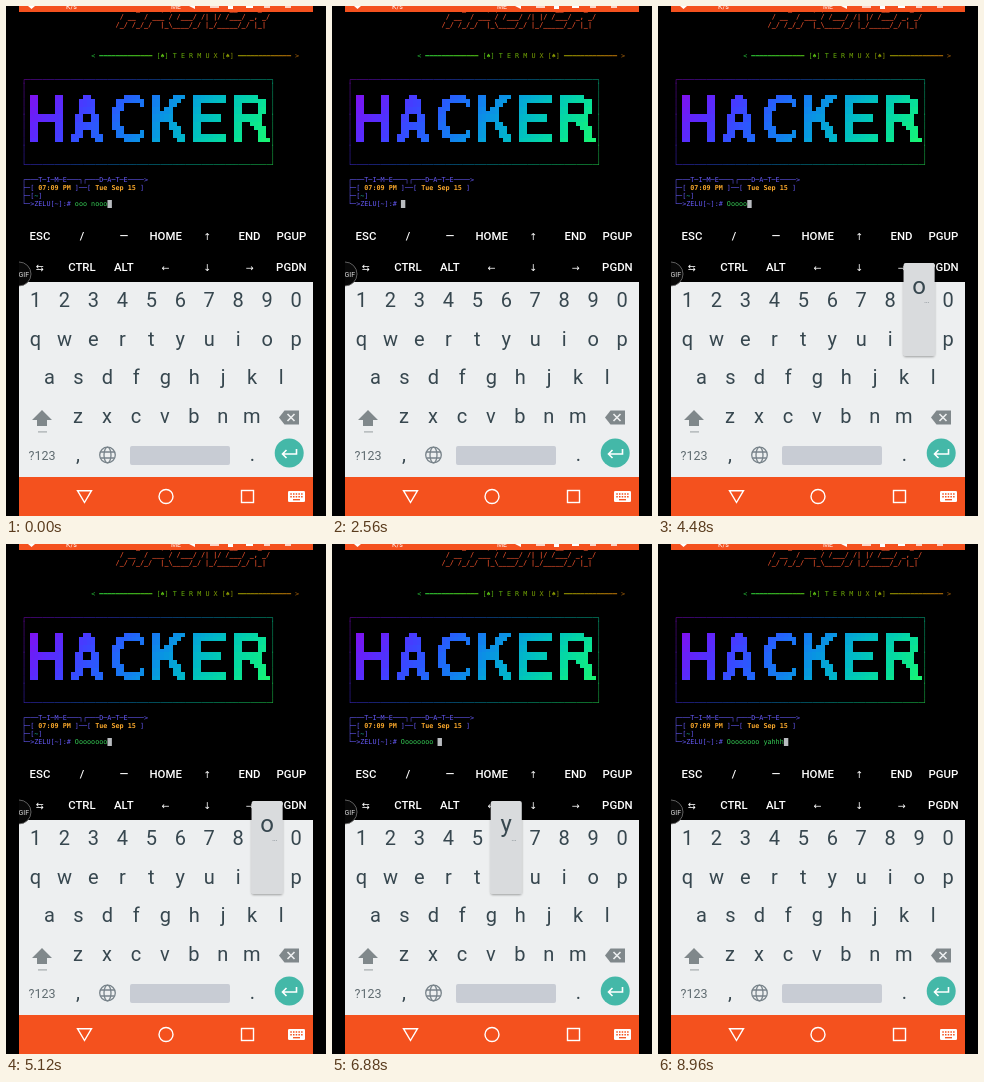
An HTML page that plays this animation: 320 by 510 pixels, repeating every 9600 ms.

```html
<!DOCTYPE html>
<html lang="en">
<head>
<meta charset="utf-8">
<style>
  html, body { margin: 0; width: 100%; height: 100%; overflow: hidden; background: #000; }
  svg { display: block; width: 320px; height: 510px; }
  text { white-space: pre; }
  .mono { font: 6.76px "DejaVu Sans Mono", monospace; }
  .bold { font-weight: bold; }
  .faint { opacity: .75; }
  .extra { font: 500 11.4px Roboto, "DejaVu Sans", sans-serif; fill: #fff; text-anchor: middle; }
  .arrow { font: 9.5px "DejaVu Sans", sans-serif; }
  .key { font: 20px Roboto, sans-serif; fill: #37474f; text-anchor: middle; }
  .nav { fill: none; stroke: #fff; stroke-width: 1.4; }
</style>
</head>
<body>
<svg id="stage" viewBox="0 0 320 510" xmlns="http://www.w3.org/2000/svg">
  <defs>
    <clipPath id="screen"><rect x="13" width="294" height="510"/></clipPath>
    <filter id="shadow" x="-20%" y="-10%" width="140%" height="120%">
      <feDropShadow dx="0" dy="1" stdDeviation="1" flood-opacity=".35"/>
    </filter>
  </defs>
  <rect width="320" height="510"/>
  <g id="terminal" class="mono"></g>
  <text class="mono" id="prompt" x="16" y="200.2"><tspan fill="#665af8">└─&gt;ZELU[~]:# </tspan><tspan id="typed" fill="#35cc55"></tspan></text>
  <rect id="cursor" y="194" width="4.4" height="8" fill="#b9bcc0"/>

  <g clip-path="url(#screen)">
    <rect x="13" width="294" height="6" fill="#f4511e"/>
    <g fill="#fff">
      <path d="M22 0h7l-3.5 3zM183 0h6v3zM240 0h7v2h-7zM222 0h5v3h-5z"/>
      <text x="60" y="3" font-family="Roboto, sans-serif" font-size="7">K/s</text>
      <text x="165" y="3" font-family="Roboto, sans-serif" font-size="7">ME</text>
      <path d="M204 1h9M258 1h6M279 1h6" stroke="#fff" stroke-width="1.4"/>
    </g>
    <rect x="13" y="276" width="294" height="195" fill="#edeff0"/>
    <rect id="pressed" y="393" width="42" height="37" rx="3" fill="#d3d8db"/>
    <g id="keys"></g>

    <g fill="#80888b">
      <path d="M36 404 46 414H41V420H31V414H26Z"/>
      <rect x="32" y="425.3" width="9" height="1.2" fill="#a5abae"/>
      <path d="M278.5 404.5H293V418.5H278.5L273 411.5Z"/>
    </g>
    <path d="M281.5 408l7 7m0-7l-7 7" stroke="#edeff0" stroke-width="1.6"/>
    <text x="36" y="453.6" font-family="Roboto, sans-serif" font-size="12.5" fill="#5f6b70" text-anchor="middle">?123</text>
    <g fill="none" stroke="#78838a" stroke-width="1.3">
      <circle cx="101.5" cy="449" r="7.8"/>
      <ellipse cx="101.5" cy="449" rx="3.5" ry="7.8"/>
      <path d="M94.5 446h14m-14 6h14"/>
    </g>
    <rect x="124" y="440" width="100" height="19" rx="2" fill="#c8ccd4"/>
    <circle cx="283.2" cy="447" r="14.5" fill="#44b8a8"/>
    <path d="M290.5 443v5H276.5m4-4-4 4 4 4" fill="none" stroke="#fff" stroke-width="1.6"/>

    <rect x="13" y="471" width="294" height="39" fill="#f4511e"/>
    <path class="nav" d="M71.5 484.7H85.5L78.5 496.5Z"/>
    <circle class="nav" cx="160" cy="490.5" r="7"/>
    <rect class="nav" x="235.5" y="484.5" width="12" height="12"/>
    <rect x="282" y="485" width="17" height="11" rx="1.3" fill="#fff"/>
    <path d="M284.3 488h13m-13 2.8h13" stroke="#f4511e" stroke-width="1.5" stroke-dasharray="1.5 1.2"/>
    <path d="M287 493.7h7" stroke="#f4511e" stroke-width="1.3"/>

    <circle cx="13" cy="268" r="12" fill="#080808" stroke="#777" stroke-width=".8"/>
    <text x="12.5" y="270.5" font-family="Roboto, sans-serif" font-size="7" fill="#ddd">GIF</text>

    <g id="popup">
      <rect x="-15.5" y="-76" width="31" height="93" rx="2" fill="#d9dbdd" filter="url(#shadow)"/>
      <text id="popupLetter" class="key" y="-45.5" style="font-size:24px"></text>
      <text x="5" y="-36" font-family="Roboto, sans-serif" font-size="8" fill="#7b858a">…</text>
    </g>
  </g>
</svg>
<script>
const $ = id => document.getElementById(id);
const CELL = 4.07, ROW = 7.75, LEFT = 16, LOOP = 9600;

function add(parent, tag, attrs, content = '') {
  const el = document.createElementNS('http://www.w3.org/2000/svg', tag);
  for (const name in attrs) el.setAttribute(name, attrs[name]);
  el.textContent = content;
  parent.append(el);
  return el;
}

// Terminal: rainbow colour depends on column and row
function rainbow(phase, col, row) {
  const angle = phase + col / 31 + row / 20;
  const channel = k => Math.round(128 + 127 * Math.sin(angle + k * 2 * Math.PI / 3));
  return `rgb(${channel(0)},${channel(1)},${channel(2)})`;
}

function rainbowLine(line, col, row, top, phase) {
  const text = add($('terminal'), 'text', { class: 'faint', x: LEFT + col * CELL, y: top + row * ROW + 2 });
  [...line].forEach((char, i) =>
    add(text, 'tspan', { fill: rainbow(phase, col + i, row) }, char));
}

const slant = [
  '  / /_/ / /| |/ /   / ,<  / __/ / /_/ /',
  ' / __  / ___ / /___/ /| |/ /___/ _, _/',
  '/_/ /_/_/  |_\\____/_/ |_/_____/_/ |_|'
];
slant.forEach((line, row) => add($('terminal'), 'text', {
  class: 'bold', x: LEFT + 23 * CELL, y: 5.4 + row * ROW, fill: '#e8502a'
}, line));

const rule = '━'.repeat(13);
rainbowLine(`< ${rule} [♠] T E R M U X [♠] ${rule} >`, 17, 0, 49.8, 5.1);

const BANNER_TOP = 73.5, BANNER_PHASE = 3;
const banner = [
  ' ▄▄    ▄▄     ▄▄        ▄▄▄▄   ▄▄   ▄▄▄  ▄▄▄▄▄▄▄▄  ▄▄▄▄▄▄',
  ' ██    ██    ████     ██▀▀▀▀█  ██  ██▀   ██▀▀▀▀▀▀  ██▀▀▀▀██',
  ' ██    ██    ████    ██▀       ██▄██     ██        ██    ██',
  ' ████████   ██  ██   ██        █████     ███████   ███████',
  ' ██    ██   ██████   ██▄       ██  ██▄   ██        ██  ▀██▄',
  ' ██    ██  ▄██  ██▄   ██▄▄▄▄█  ██   ██▄  ██▄▄▄▄▄▄  ██    ██',
  ' ▀▀    ▀▀  ▀▀    ▀▀     ▀▀▀▀   ▀▀    ▀▀  ▀▀▀▀▀▀▀▀  ▀▀    ▀▀▀'
];
for (let row = 0; row <= 11; row++) {
  const edge = row === 0 ? '┌─┐' : row === 11 ? '└─┘' : '│ │';
  rainbowLine(edge[0] + edge[1].repeat(60) + edge[2], 0, row, BANNER_TOP, BANNER_PHASE);
}
banner.forEach((line, i) => [...line].forEach((char, j) => {
  if (char === ' ') return;
  const row = i + 2, col = j + 1;
  const middle = BANNER_TOP + row * ROW;
  add($('terminal'), 'rect', {
    x: LEFT + col * CELL,
    y: char === '▄' ? middle : middle - ROW / 2,
    width: CELL,
    height: char === '█' ? ROW : ROW / 2,
    fill: rainbow(BANNER_PHASE, col, row),
    'shape-rendering': 'crispEdges'
  });
}));

const BLUE = '#665af8', AMBER = '#f5a52a';
const status = [
  [['┌───T─I─M─E───┐┌───D─A─T─E────>', BLUE]],
  [['├─[ ', BLUE], ['07:09 PM', AMBER, 'bold'], [' ]──[ ', BLUE], ['Tue Sep 15', AMBER, 'bold'], [' ]', BLUE]],
  [['├─[', BLUE], ['~', '#20b8a0'], [']', BLUE]]
];
status.forEach((parts, row) => {
  const text = add($('terminal'), 'text', { x: LEFT, y: 176.2 + row * 8 });
  parts.forEach(([content, fill, weight = '']) => add(text, 'tspan', { fill, class: weight }, content));
});

// Keyboard
const extraKeys = ['ESC / — HOME ↑ END PGUP', '⇆ CTRL ALT ← ↓ → PGDN'];
extraKeys.forEach((line, row) => line.split(' ').forEach((label, i) => {
  const arrow = '←↑→↓⇆'.includes(label);
  add($('keys'), 'text', {
    class: arrow ? 'extra arrow' : 'extra', x: 34 + 41.9 * i, y: 234 + 31 * row
  }, label);
}));

const keyRows = [
  ['1234567890', 29.5, 294, 301],
  ['qwertyuiop', 29.5, 333, 339.5],
  ['asdfghjkl', 43.5, 371, 378],
  ['zxcvbnm', 72, 411, 417.3]
];
const keys = {};
for (const [chars, x0, middle, baseline] of keyRows) {
  [...chars].forEach((char, i) => {
    const x = x0 + 28.95 * i;
    keys[char] = { x, y: middle, label: add($('keys'), 'text', { class: 'key', x, y: baseline }, char) };
  });
}
add($('keys'), 'text', { class: 'key', x: 72, y: 455 }, ',');
add($('keys'), 'text', { class: 'key', x: 246.5, y: 455 }, '.');

// Start time, typed text, popup key, held key position, capitals
const DELETE = 263, SHIFT = 15;
const steps = [
  [0, 'ooo nooo'],
  [1440, 'ooo noo', '', DELETE],
  [1920, 'ooo n', '', DELETE],
  [2080, 'ooo', '', DELETE],
  [2240, '', '', DELETE],
  [2560, ''],
  [2720, '', '', SHIFT],
  [2880, '', '', 0, true],
  [3200, '', 'o', 0, true],
  [3840, 'O'],
  [4000, 'Oo', 'o'],
  [4160, 'Ooo', 'o'],
  [4480, 'Ooooo', 'o'],
  [4800, 'Oooooo', 'o'],
  [4960, 'Ooooooo', 'o'],
  [5120, 'Oooooooo', 'o'],
  [5440, 'Oooooooo'],
  [5600, 'Oooooooo '],
  [6880, 'Oooooooo ', 'y'],
  [7200, 'Oooooooo y'],
  [7840, 'Oooooooo y', 'a'],
  [8000, 'Oooooooo ya'],
  [8480, 'Oooooooo ya', 'h'],
  [8800, 'Oooooooo yahh', 'h'],
  [8960, 'Oooooooo yahhh']
];

let shown;
function show(step) {
  if (step === shown) return;
  shown = step;
  const [, typed, popup, held, capitals] = step;
  const cased = char => capitals ? char.toUpperCase() : char;
  $('typed').textContent = typed;
  $('cursor').setAttribute('x', LEFT + (13 + typed.length) * CELL);
  for (const char in keys) keys[char].label.textContent = cased(char);
  $('pressed').style.display = held ? '' : 'none';
  if (held) $('pressed').setAttribute('x', held);
  $('popup').style.display = popup ? '' : 'none';
  if (popup) {
    $('popup').setAttribute('transform', `translate(${keys[popup].x} ${keys[popup].y})`);
    $('popupLetter').textContent = cased(popup);
  }
}

function tick() {
  const time = performance.now() % LOOP;
  show(steps.findLast(([start]) => start <= time));
  requestAnimationFrame(tick);
}
tick();
</script>
</body>
</html>
```
